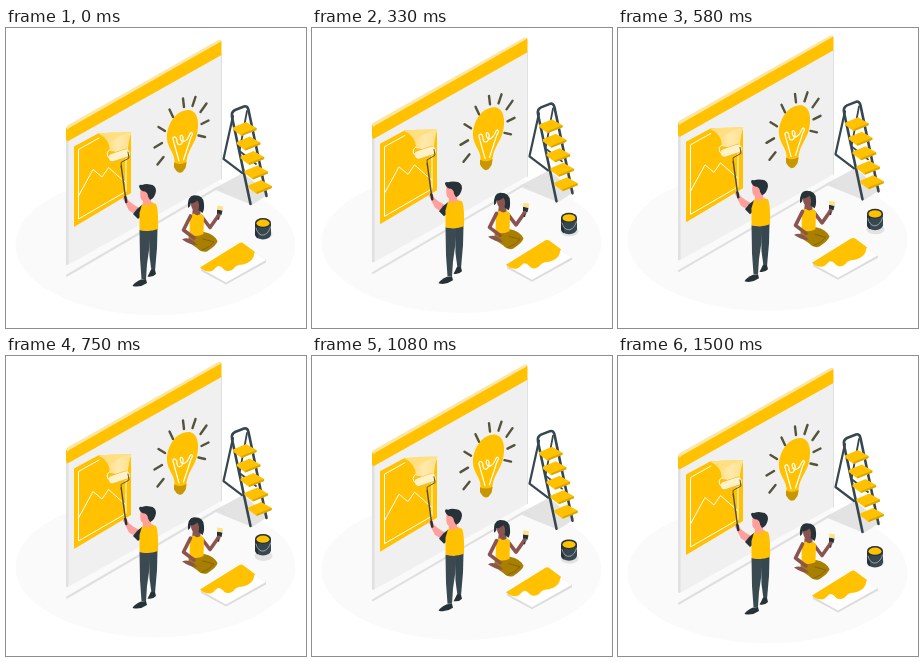
Write an HTML page that moves like this. It is 300x300 px and loops after 1.54 s.

```html
<!DOCTYPE html>
<html lang="en">
<head>
<meta charset="utf-8">
<title>Painting a board</title>
<style>
html, body { margin: 0; width: 100%; height: 100%; overflow: hidden; background: #fff; }
svg { display: block; width: 100vw; height: 100vh; }
.y { fill: #ffc100; }
.d { fill: #263238; }
.s { fill: #37474f; }
.skin { fill: #ff9f9b; }
.brown { fill: #8a5550; }
.line { fill: none; stroke-linecap: round; stroke-linejoin: round; }
.w { stroke: #fff; stroke-width: 1; }
.rail { stroke: #37474f; stroke-width: 2.6; }
.arm { stroke: #ff9f9b; stroke-width: 4; }
.bare { stroke: #8a5550; stroke-width: 3.6; }
</style>
</head>
<body>
<svg viewBox="0 0 300 300">
<defs>
  <linearGradient id="curl">
    <stop offset="0" stop-color="#ffd65c"/>
    <stop offset=".6" stop-color="#ffe9ac"/>
    <stop offset="1" stop-color="#ffe08a"/>
  </linearGradient>
</defs>
<g id="scene">
  <ellipse cx="149.500" cy="217" rx="140" ry="70.400" fill="#fafafa"/>

  <!-- floor shadows -->
  <path d="M207 161L237 145L263 166L246 177Z" fill="#e3e3e3"/>
  <ellipse cx="257.500" cy="206" rx="9" ry="5" fill="#e2e2e2"/>

  <!-- board -->
  <path d="M61 247.500L212 159.500L218 162" class="line" stroke="#e0e0e0" stroke-width="2.200"/>
  <path d="M61 110L215.500 24V151L61 237.500Z" fill="#f0f0f0"/>
  <path d="M60 110V237L62.500 236.500V110Z" fill="#e0e0e0"/>
  <path d="M215.500 27V151" class="line" stroke="#e0e0e0" stroke-width="1"/>
  <path d="M60 101Q60 98.500 62 97.500L212 12.800Q215.500 11.500 215.500 14V27L62 113.300Q60 113.500 60 111Z" class="y"/>
  <path d="M60.300 99.500Q61 98 62 97.200L212 12.300Q214 11.500 215 13.500L63.500 99.800Q62 100.800 61.800 102Z" fill="#ffe6a3"/>

  <!-- poster -->
  <path d="M68 118.500L93 105L125 107V165L68 199Z" class="y"/>
  <path d="M93 110L72.500 121.500V191L120 163.500V130" class="line w"/>
  <path d="M72.500 168L87 141.500L96 149L102.500 139.500L120 155" class="line w"/>
  <circle cx="106" cy="126" r="4.800" class="line w"/>
  <path d="M92 105.500Q108 103.500 125.500 104Q122.500 112 121.500 125L104 123Q104 111 92 105.500Z" fill="url(#curl)"/>
  <path d="M92 105.500Q108 103.500 125.500 104Q113 107 105 114Q100 108 92 105.500Z" fill="#ffdf80"/>

  <!-- bulb -->
  <path d="M184 82C192 84 193.500 95 191 106C189 116 182.500 120 180.500 133L180 139L168 138L168.500 133C168.500 125 161 119 161 110C160.500 96 171 80.500 184 82Z" class="y"/>
  <path d="M168 134.500Q174 137.500 180.500 134L179.500 140L176.500 144Q173 146 170.500 143L168 139.500Z" fill="#c89600"/>
  <path d="M173 133L167.500 113C165 108 171 107 171 113C171 118 176 118 177 112C177.500 106 173 106 174.500 111C176 116 181 113 183 108C185 102 188 105 185 109L177.500 132" class="line w" style="stroke-width:1.200"/>
  <path id="rays" class="line" stroke="#55533c" stroke-width="2.400"/>

  <!-- ladder -->
  <path d="M241 83L233.500 123L250 136" class="line rail" style="stroke-width:1.800"/>
  <path d="M227 88L217.500 131L236 145" class="line rail" style="stroke-width:2.200"/>
  <path d="M244.500 176L226 89Q225 84 229 82L238 78.500Q241.500 77.500 242.500 82L260.500 168" class="line rail"/>
  <g id="steps" class="y"></g>

  <!-- paper -->
  <path d="M195 241L235 216L260 232V234.500L220 256.500L195 243Z" fill="#dcdcdc"/>
  <path d="M195 240.500L235 216L260 232L220 254.500Z" fill="#fff"/>
  <path d="M194 239.500L233.500 215Q235.500 214 237.500 215.500L249 224C247 227 249 230 243 234C236 238.500 234 235 229 239C226 243 221 245 217 240.500C210 234 211 242 204 243.500Q198 243.500 194 239.500Z" class="y"/>

  <!-- standing painter -->
  <path d="M143 202L151.500 200L151 220L149 243H145.500L143.500 228Z" class="s"/>
  <path d="M133.500 202L144.500 203L143 222L141 236L140 251H135.500L134 230Z" fill="#3b4a51"/>
  <path d="M145 241.500L149 242L150 246Q147 249.500 141.500 248.500Q143 246 145 241.500Z" class="d"/>
  <path d="M135 251.500L140 251L141 255Q134 260 126.500 258Q128 254.500 135 251.500Z" class="d"/>
  <path d="M131 185L124.500 181L119 170" class="line arm"/>
  <path d="M133 182L127.500 179L122 175" class="line arm"/>
  <path d="M136.500 166L145 166V178H137Z" class="skin"/>
  <path d="M136.500 176.500L131 181L127 186L132 191L139 185Z" class="d"/>
  <path d="M136 176.500Q144 173.500 150 176Q152.500 181 152 201Q143 204.500 133.500 202L133.500 185Z" class="y"/>
  <path d="M137.500 175.500Q141.500 179 146 174.500" class="line arm" style="stroke-width:1.300"/>
  <path d="M134.500 161Q133.500 171 136 172.500Q140 174 144 170V160Z" class="skin"/>
  <path d="M133 158.500Q133 156 136 157Q140 155.500 144 156.500Q150 157 150 163Q149 170 144 172L142 168.500Q142 165 139 163.500Q134.500 163.500 133 158.500Z" class="d"/>

  <!-- roller -->
  <path d="M104 130.500L122 124.500" class="line" stroke="#e8bd45" stroke-width="9" style="stroke-linecap:butt"/>
  <path d="M106.500 129.500L120 125" class="line" stroke="#fff2c6" stroke-width="7.500"/>
  <path d="M122 124L123 130L115 134.500L115.500 140" class="line" stroke="#5d5530" stroke-width="1"/>
  <path d="M115.200 138L120 173" class="line" stroke="#4c4c3a" stroke-width="1.400"/>
  <path d="M119.300 169L120.300 174" class="line" stroke="#263238" stroke-width="2.400"/>

  <!-- kneeling painter -->
  <path d="M183 206L198 204Q208 206 211.500 213Q211 217 201 223.500Q196 225 191 220L182 214Z" fill="#a87f00"/>
  <path d="M197 211L208 214Q203 220 196 222" class="line" stroke="#856500" stroke-width="1"/>
  <path d="M176 211.500Q182 208.500 188 213.500L191 217Q183 216.500 176 211.500Z" class="brown"/>
  <path d="M196 189L204 199.500L212.500 187.500" class="line bare"/>
  <path d="M187 178H194.500V189H186Z" class="brown"/>
  <path d="M184 187L188 185.500Q191 189 195 185.500L198 188.500L197.500 206Q190 209.500 183.500 206.500Z" class="y"/>
  <path d="M184.500 188L177.500 202L188 210" class="line bare"/>
  <path d="M185 170H194V178Q193 183.500 189 183Q185 181 185 176Z" class="brown"/>
  <path d="M182 180Q181 168 188 167.300Q198 167 198 176Q198.500 182 196.500 185L192.500 182Q194 176 191.500 172.500Q188 175.500 184.500 175.500Q185 178 182 180Z" class="d"/>
  <path d="M211 181.500L216.500 182.500L215.500 187L211 186Z" class="d"/>
  <path d="M211.500 177.500L217 178.500L216.500 182.500L211 181.500Z" fill="#ffe083"/>
  <path d="M213 187L212.500 191" class="line" stroke="#263238" stroke-width="1.500"/>
  <circle cx="212.500" cy="187.500" r="2" class="brown"/>

  <g id="can">
    <path d="M249 195V206.500Q250 211 257 211.500Q264 211 265 206.500V195Z" class="s"/>
    <path d="M249 195V206.500Q249.500 209 252 210.500V198Z" class="d"/>
    <ellipse cx="257" cy="195" rx="8" ry="4.900" class="d"/>
    <ellipse cx="257" cy="195.200" rx="6.500" ry="3.600" class="y"/>
    <path d="M250 200Q252 208 258 207Q263 205 264.500 199" class="line" stroke="#b0b7ba" stroke-width=".8"/>
  </g>
</g>
</svg>
<script>
const $ = id => document.getElementById(id);
const LOOP = 1540, CYCLE = 1500, LIFT = 6;

const rays = [
  [177, 70.5, 178, 79], [189.5, 69, 186.5, 78], [200.5, 75.5, 194.5, 84],
  [202.5, 92.5, 195.5, 96], [192.5, 107.5, 199, 109], [163.5, 81.5, 167, 89],
  [152.5, 99, 159, 103], [148.5, 119.5, 156, 115], [151.5, 136.5, 157.5, 129]
];
$("rays").setAttribute("d", rays.map(([a, b, c, d]) => `M${a} ${b}L${c} ${d}`).join(""));

let steps = "";
for (let i = 0; i < 5; i++) {
  const x = 227 + i * 3.8, y = 99.5 + i * 14.5;
  steps += `<path d="M${x} ${y}l13 -5.500l10.500 6v2l-15 6l-8.500 -6.500z"/>` +
    `<path d="M${x + 8.5} ${y + 6.5}l15 -6v2l-15 6z" fill="#dba600"/>`;
}
$("steps").innerHTML = steps;

// Everything floats up and back at constant speed; the can rises twice as far.
function draw(ms) {
  const p = Math.min(ms % LOOP, CYCLE) / CYCLE;
  const y = -LIFT * (1 - Math.abs(2 * p - 1));
  const shift = `translate(0 ${y.toFixed(3)})`;
  $("scene").setAttribute("transform", shift);
  $("can").setAttribute("transform", shift);
}

const start = performance.now();
function tick() {
  draw(performance.now() - start);
  requestAnimationFrame(tick);
}
draw(0);
requestAnimationFrame(tick);
</script>
</body>
</html>
```
